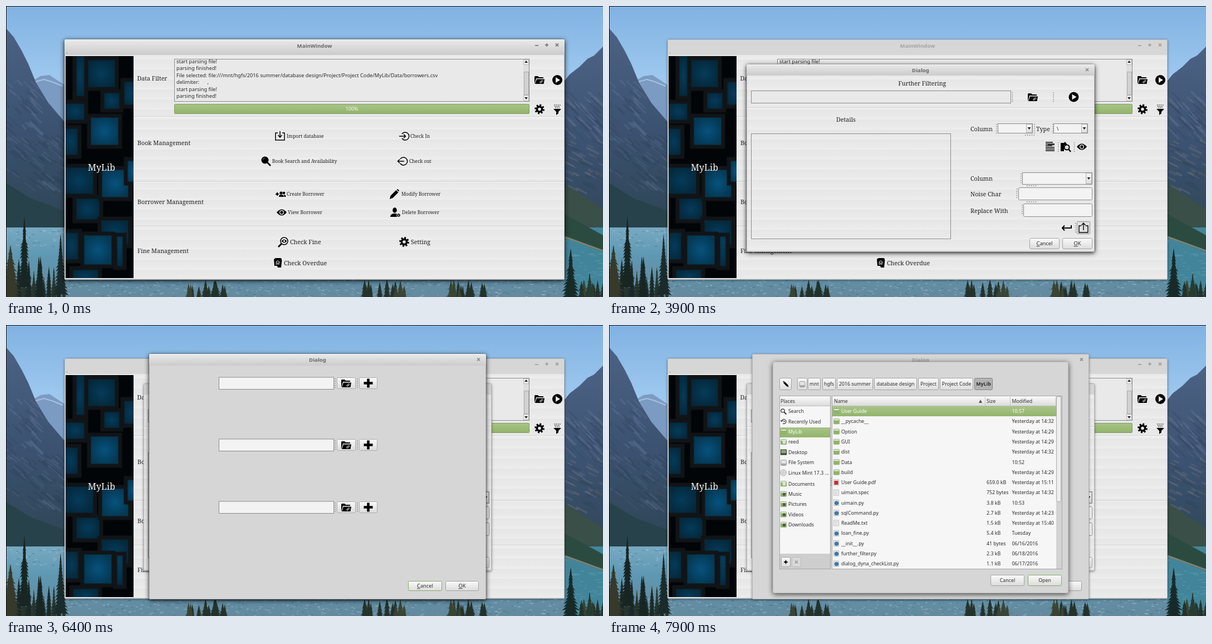
An HTML page for the animation above (8 s loop, 1072 px wide and 523 px high).

```html
<!DOCTYPE html>
<html lang="en">
<head>
<meta charset="utf-8">
<title>Library desktop</title>
<style>
html, body { margin: 0; width: 100%; height: 100%; overflow: hidden; background: #000; }
svg { display: block; width: 1072px; height: 523px; font-family: "Noto Sans", "Open Sans", sans-serif; }
text { white-space: pre; }
.serif { font-family: "Noto Serif", serif; }
.glow { filter: drop-shadow(0 2px 5px rgba(0,0,0,.7)); }
.soft { filter: drop-shadow(0 1px 2px rgba(0,0,0,.45)); }
.fade { animation: fade 8s step-end infinite; }
@keyframes fade { 0% { opacity: 0 } 7.5% { opacity: .85 } 8.75% { opacity: 1 } }
</style>
</head>
<body>
<svg id="stage" viewBox="0 0 1072 523">
<defs>
  <linearGradient id="sky" x2="0" y2="1"><stop stop-color="#80b2e2"/><stop offset=".35" stop-color="#a2cbf0"/><stop offset="1" stop-color="#c3dcf2"/></linearGradient>
  <linearGradient id="rock" x2="0" y2="1"><stop stop-color="#4c6284"/><stop offset=".5" stop-color="#3c5271"/><stop offset="1" stop-color="#2d4555"/></linearGradient>
  <linearGradient id="lake" x2="0" y2="1"><stop stop-color="#78a9c2"/><stop offset=".4" stop-color="#5f98b2"/><stop offset="1" stop-color="#64899d"/></linearGradient>
  <linearGradient id="bar" x2="0" y2="1"><stop stop-color="#eaeaea"/><stop offset="1" stop-color="#cbcbcb"/></linearGradient>
  <linearGradient id="btn" x2="0" y2="1"><stop stop-color="#fafafa"/><stop offset="1" stop-color="#dcdcdc"/></linearGradient>
  <linearGradient id="lit" x2="0" y2="1"><stop stop-color="#fff"/><stop offset="1" stop-color="#e8e8e8"/></linearGradient>
  <linearGradient id="green" x2="0" y2="1"><stop stop-color="#a8c487"/><stop offset="1" stop-color="#92b46c"/></linearGradient>
  <linearGradient id="ask" x2="0" y2="1"><stop stop-color="#7ba4dc"/><stop offset="1" stop-color="#3a66b0"/></linearGradient>
  <linearGradient id="stripe" gradientUnits="userSpaceOnUse" x1="0" y1="6" x2="0" y2="24" spreadMethod="repeat"><stop stop-color="#e6e6e6"/><stop offset=".7" stop-color="#eaeaea"/><stop offset="1" stop-color="#eeeeee"/></linearGradient>
  <radialGradient id="tile"><stop stop-color="#07527d"/><stop offset="1" stop-color="#043752"/></radialGradient>
  <clipPath id="side"><path d="M107 90h122v399h-122z"/></clipPath>
  <clipPath id="log"><path d="M303 96h625v74h-625z"/></clipPath>
</defs>
</svg>
<script>
const LOOP = 8000;
const svg = document.getElementById('stage');

// Timed layers: class name, start and end in ms
const spans = {
  mainOn: [0, 600], funnelOn: [500, 600], dlgOn: [600, 4000], shareOn: [3900, 4000],
  ask: [4000, 6400], noLit: [4400, 6300], saveLit: [5100, 5200], noDown: [6300, 6400],
  pick: [6400, LOOP], pickOn: [6400, 7900], openLit: [7500, 7900], openDown: [7700, 7800],
  files: [7900, LOOP]
};
const pct = ms => ms / LOOP * 100 + '%';
const css = Object.entries(spans).map(([id, [a, b]]) =>
  `.${id}{animation:${id} 8s step-end infinite}@keyframes ${id}{` +
  (a ? '0%{opacity:0}' : '') + `${pct(a)}{opacity:1}` + (b < LOOP ? `${pct(b)}{opacity:0}` : '') + '}').join('');
document.head.appendChild(document.createElement('style')).textContent = css;

let seed = 7;
const rnd = () => (seed = seed * 16807 % 2147483647) / 2147483647;

const fill = (x, y, w, h, c, more = '') => `<rect x="${x}" y="${y}" width="${w}" height="${h}" fill="${c}" ${more}/>`;
const box = (x, y, w, h, c = '#e9e9e9', line = '#8c8c8c', r = 0) =>
  fill(x + .5, y + .5, w - 1, h - 1, c, `stroke="${line}" rx="${r}"`);
const poly = (d, c, more = '') => `<path d="${d}" fill="${c}" ${more}/>`;
const line = (d, w = 1.5, c = '#000', more = '') => `<path d="${d}" fill="none" stroke="${c}" stroke-width="${w}" ${more}/>`;
const text = (x, y, s, size = 9.2, c = '#2b2b2b', more = '') =>
  `<text x="${x}" y="${y}" font-size="${size}" fill="${c}" ${more}>${s}</text>`;
const serif = (x, y, s, size = 10.7, c = '#222') => text(x, y, s, size, c, 'class="serif"');
const mid = 'text-anchor="middle"';
const layer = (cls, s) => `<g class="${cls}">${s}</g>`;
const dots = (x, y, len, flat) => line(`M${x} ${y}${flat ? 'h' : 'v'}${len}`, 1.3, '#777', 'stroke-dasharray="1.5 2.4"');
const key = s => `<tspan text-decoration="underline">${s[0]}</tspan>${s.slice(1)}`;
const button = (x, y, w, h, s = '', edge = '#a2a2a2', face = 'url(#btn)', size = 9.3) =>
  box(x, y, w, h, face, edge, 2) + text(x + w / 2, y + h / 2 + 3.3, s, size, '#2b2b2b', mid);
const cross = (x, y, c) => line(`M${x - 2.5} ${y - 2.5}l5 5m0-5l-5 5`, 1.6, c);

const icons = {
  folder: poly('M-9 7V-6l1-1h5l2 2h8v2h-13l-2 7z', '#000') + poly('M-8 7l3-8.500h14l-1.500 8.500z', '#000') +
    '<g fill="none" stroke="#ddd" stroke-width=".9"><circle cx="2" cy="4" r="1.400"/><circle cx="4.600" cy="1.800" r="1.400"/></g>',
  play: '<circle r="9"/>' + poly('M-3-5l8 5-8 5z', '#f0f0f0'),
  gear: '<circle r="6.4"/><circle r="7.2" fill="none" stroke="#000" stroke-width="3.4" stroke-dasharray="2.83"/><circle r="2.8" fill="#e9e9e9"/>',
  funnel: poly('M-7-1h14l-5 5v3l-4 3v-6z', '#000') + line('M-6-8h12M-5-5.500h10M-4-3h8', 1.2, '#222', 'stroke-dasharray="2 1.3"'),
  load: line('M-4-6h-4v13h16v-13h-4M0-9v11M-3.500-2l3.500 4 3.500-4'),
  search: '<circle cx="-2" cy="-2" r="6.500"/>' + line('M2 2l6 6', 2.6) + line('M-6-2q0-4 4-4', .8, '#888'),
  enter: line('M-4-4a7 7 0 1 1 0 8M-9 0h11M-1-3.500l3.500 3.500-3.500 3.500'),
  leave: line('M-4-4a7 7 0 1 1 0 8M-8 0h11M-5-3.500l-3.500 3.500 3.500 3.500'),
  people: line('M-9 0h6M-6-3v6', 2) + '<circle cx="1" cy="-2" r="2.600"/><circle cx="6" cy="-2" r="2.300"/>' + poly('M-3 5q0-4 4-4 5 0 5 4zM6.700 5q0-3-1.200-4 4 0 4 4z', '#000'),
  pencil: poly('M-9 9l1.500-6 10-10 4 4-10 10zM3.500-8l1.500-1q1 0 3 2.500l-1 2z', '#000'),
  eye: poly('M-9 0q9-11 18 0-9 11-18 0z', '#000') + '<circle r="4" fill="#eee"/><circle r="2.700"/>',
  person: '<ellipse cx="-1" cy="-4" rx="3.800" ry="4.700"/>' + poly('M-9 8q0-5 6-6h4q5 1 5 6z', '#000') + '<circle cx="6" cy="5" r="3.300" stroke="#eee"/><circle cx="6" cy="5" r="1" fill="#eee"/>',
  inspect: '<circle cx="1.500" cy="-1.500" r="6.500" fill="none" stroke="#000" stroke-width="1.500"/>' + line('M-3 3l-6 6', 2.8) + `<g transform="translate(1.500 -1.500) scale(.55)">${poly('M-9 0q9-11 18 0-9 11-18 0z', '#000')}<circle r="3" fill="#eee"/></g>`,
  head: poly('M-7-7l3-2h9q3 0 2 8l-1 9h-6l-1-3h-5z', '#000') + line('M-4 2h7M-3 0q0-4 3-4t3 4z', 1, '#eee'),
  list: line('M-8-8h13M-8-5h16M-8-2h12M-8 1h16M-8 4h16M-8 7h16', 1.6) + line('M-4-4h12', 2.4, '#333'),
  page: poly('M-9-7h6l2-2 3 4v2h-5v11h-6z', '#000') + '<circle cx="2" cy="1" r="4.500" fill="#ddd" stroke="#000" stroke-width="2"/>' + line('M5 4l4 5', 2.4),
  back: line('M8-5v5h-16M-4-4.500l-4 4.500 4 4.500', 2),
  share: line('M-4-4h-4v12h16v-12h-4M0 4v-12M-3.500-5l3.500-4 3.500 4', 1.4),
  plus: line('M-8 0h16M0-8v16', 4.5)
};
const icon = (id, x, y, k = 1, flip = k) => `<g transform="translate(${x} ${y}) scale(${flip} ${k})">${icons[id]}</g>`;

// Window frame with a flat bar, plus a livelier one while it has focus
function frame(x, y, w, h, bar, title, tx, ty, on, body) {
  const shape = c => `<rect x="${x}" y="${y}" width="${w}" height="${h}" rx="3" fill="#d6d6d6" class="${c}"/>`;
  const head = c => text(tx, ty, title, 9.65, c, mid + ' font-weight="700"');
  return layer(on, shape('glow')) + shape('soft') + box(x, y, w, h, '#d6d6d6', '#b5b5b5', 3) + head('#a3a3a3') +
    layer(on, fill(x, y, w, bar, 'url(#bar)', 'rx="3"') + fill(x + 2, y, w - 4, 1, '#f6f6f6') + head('#666')) + body;
}

function conifer(x, top, h, w, c) {
  let l = '', r = '';
  const n = Math.max(4, Math.round(h / 6));
  for (let i = 1; i <= n; i++) {
    const y = top + h * i / n, s = w / 2 * i / n * (.7 + rnd() * .5);
    r += `L${x + s} ${y}L${x + s * .5} ${y - 2}`;
    l = `L${x - s * .5} ${y - 2}L${x - s} ${y}` + l;
  }
  return poly(`M${x} ${top}${r}${l}z`, c);
}

// Soft random streaks running down a slope
function streaks(x, y, w, h, lean, n, colors) {
  let s = '';
  for (let i = 0; i < n; i++) {
    const a = x + rnd() * w, b = y + rnd() * h, k = 8 + rnd() * 16;
    s += line(`M${a} ${b}l${k} ${k * lean}`, 1.5 + rnd() * 2.5, colors[i % colors.length], 'opacity=".35"');
  }
  return s;
}

function scene() {
  let s = fill(0, 0, 1072, 420, 'url(#sky)') +
    poly('M38 140l24-14 16-2 30 20v250h-70z', '#7b9bc2') + line('M50 137l18-5 14 4 20 8', 2, '#a8c2e0') +
    poly('M0 40l14 16 14 24 12 24 14 34 22 36 29 34v190H0z', 'url(#rock)') +
    streaks(-10, 130, 60, 90, 1, 40, ['#64779a', '#33465f']) + streaks(-10, 230, 105, 95, .8, 70, ['#556d86', '#2b3f55']) +
    poly('M0 318l45 28 60 22v34H0z', '#27424a') +
    poly('M1000 138l12-15 18-14 14-14 12-6 16-16v350h-72z', 'url(#rock)') +
    streaks(1000, 150, 66, 80, 1, 50, ['#6b7894', '#33455f']) + streaks(1000, 240, 66, 90, .5, 50, ['#77797a', '#34465a']) +
    poly('M1003 320l69 45v62l-69-30z', '#394f48') +
    fill(0, 398, 1003, 125, 'url(#lake)') + fill(1003, 398, 69, 125, '#42859a') +
    poly('M1003 374l69 38v30l-69-26z', '#2c4b40') + line('M1003 415l69 25', 3, '#7d8270');
  for (let i = 0; i < 900; i++)
    s += fill(rnd() * 1003, (i % 2 ? 490 : 402) + rnd() * 32, 2 + rnd() * 4, 1, i % 3 ? '#b4cbd8' : '#3d647c', 'opacity=".6"');
  for (let i = 0; i < 50; i++) s += fill(1003 + rnd() * 66, 440 + rnd() * 80, 3 + rnd() * 8, 1, '#73aab8', 'opacity=".5"');
  for (let x = -4; x < 108; x += 9) s += conifer(x, 450 + rnd() * 45, 95, 26, x % 2 ? '#1b2a28' : '#26352d');
  s += conifer(33, 377, 130, 27, '#172523') + conifer(62, 450, 75, 22, '#172523') +
    conifer(98, 410, 110, 25, '#1b2a2b') + conifer(8, 430, 95, 42, '#37392a');
  for (let i = 0; i < 48; i++) {
    const x = [325, 640, 790, 1005][i % 4] + rnd() * 80;
    s += conifer(x, 490 + rnd() * 18, 44, 22, i % 3 ? '#24322b' : '#3a4433');
  }
  s += conifer(376, 493, 40, 30, '#20332c') + conifer(1014, 436, 95, 34, '#182a28') + conifer(1048, 480, 60, 24, '#263b31');
  return s + fill(0, 0, 1072, 1, '#111') + fill(0, 0, 1, 523, '#111');
}

function sidebar() {
  const tiles = [[147, 97, 49, 49], [212, 136, 24, 42], [176, 156, 28, 29], [152, 200, 50, 50], [107, 175, 34, 30],
    [104, 220, 25, 48], [105, 290, 52, 48], [126, 346, 42, 38], [172, 294, 48, 50], [218, 278, 20, 38],
    [171, 385, 49, 44], [105, 407, 25, 49], [199, 414, 11, 54], [140, 412, 50, 53], [126, 90, 15, 72], [120, 474, 46, 25]];
  const bright = [3, 8, 9, 13];
  const art = tiles.map(([x, y, w, h], i) => fill(x - 3, y - 3, w + 6, h + 6, 'url(#tile)',
    `stroke="#111416" stroke-width="7" ${bright.includes(i) ? '' : 'fill-opacity=".7"'}`)).join('');
  return fill(107, 90, 122, 399, '#020507') + `<g clip-path="url(#side)">${art}</g>` + serif(147, 296, 'MyLib', 16, '#f4f4f4');
}

function mainWindow() {
  const log = ['start parsing file!', 'parsing finished!',
    'File selected: file:///mnt/hgfs/2016 summer/database design/Project/Project Code/MyLib/Data/borrowers.csv',
    'delimiter:      ,', 'start parsing file!', 'parsing finished!'];
  const actions = [
    ['load', 492, 234, 504, 'Import database'], ['enter', 715, 234, 726, 'Check In'],
    ['search', 467, 279, 478, 'Book Search and Availability'], ['leave', 712, 279, 724, 'Check out'],
    ['people', 493, 338, 504, 'Create Borrower'], ['pencil', 698, 338, 710, 'Modify Borrower'],
    ['eye', 495, 371, 506, 'View Borrower'], ['person', 699, 371, 711, 'Delete Borrower'],
    ['inspect', 498, 424, 510, 'Check Fine', 1], ['gear', 715, 424, 727, 'Setting', 1], ['head', 488, 462, 499, 'Check Overdue', 1]];
  const win = c => line('M950 71h6', 1.5, c) + line('M968 70h6m-3-3v6', 1.5, c) + cross(989.500, 70, c);
  let s = win('#999') + layer('mainOn', win('#777')) + fill(106, 88, 896, 402, 'url(#stripe)') + fill(109, 84, 1, 1, '#555') + sidebar();
  for (const y of [198, 315, 395]) s += fill(229, y, 773, 1, '#cfcfcf') + fill(229, y + 1, 773, 1, '#f8f8f8');
  s += serif(235.500, 133.500, 'Data Filter') + serif(236, 250, 'Book Management') +
    serif(236, 356, 'Borrower Management') + serif(236, 444, 'Fine Management') + box(302, 95, 638, 77);
  s += '<g clip-path="url(#log)">' + log.map((t, i) => text(306, 103 + i * 12.4, t)).join('') + '</g>';
  s += fill(929, 96, 10, 75, '#dedede') + box(929, 96, 10, 10, '#eee', '#bbb') + box(929, 160, 10, 11, '#eee', '#bbb') +
    box(930, 118, 9, 42, '#d2d2d2', '#aaa') + poly('M931 102l3-4 3 4z', '#222') + poly('M931 164l3 4 3-4z', '#222') +
    box(302, 176, 638, 18, 'url(#green)', '#7f9c62', 1) + text(621, 188.300, '100%', 8.8, '#f5f8f0', mid);
  s += layer('funnelOn', box(979, 175, 22, 21, '#dedede', '#999', 2));
  s += icon('folder', 958, 133) + icon('play', 990, 133) + icon('gear', 958, 185.500) + icon('funnel', 990, 186);
  for (const [id, x, y, tx, t, big] of actions) s += icon(id, x, y) + serif(tx, y + (big ? 4 : 3.2), t, big ? 10.7 : 8.5);
  return frame(105, 60, 898, 432, 28, 'MainWindow', 554, 74.500, 'mainOn', s);
}

function combo(x, y, w, h) {
  return box(x, y, w, h, '#f3f3f3') + box(x + w - 12, y + 1, 11, h - 2, 'url(#btn)', '#b5b5b5') +
    poly(`M${x + w - 9.500} ${y + h / 2 - 2}h6l-3 4z`, '#222');
}

function filterDialog() {
  let s = cross(858.500, 114.500, '#888') + fill(248, 125, 623, 315, 'url(#stripe)') +
    serif(519.500, 143, 'Further Filtering') + box(255, 152, 467, 23) + dots(724.500, 155, 18) + icon('folder', 761, 164) +
    dots(798, 155, 18) + icon('play', 834.500, 163.500) + fill(248, 182, 623, 1, '#d0d0d0') + fill(248, 183, 623, 1, '#f7f7f7') +
    serif(408, 208, 'Details') + box(255, 229, 359, 190, 'url(#stripe)') +
    serif(649, 225, 'Column') + dots(696, 212, 18) + combo(698, 211, 63, 18) + dots(764, 212, 18) +
    serif(767, 225, 'Type') + dots(797, 212, 18) + combo(798, 211, 62, 18) + text(804, 223.500, '\\') + dots(747, 232, 17, 1) +
    icon('list', 792, 253) + dots(807, 245, 18) + icon('page', 820, 253) + dots(835.500, 245, 18) + icon('eye', 849, 253) +
    serif(649, 314, 'Column') + dots(740, 301, 19) + combo(742, 299, 126, 22) + dots(750, 323, 19, 1) +
    serif(649, 342, 'Noise Char') + dots(732.500, 328, 19) + box(735, 326, 133, 23, '#f3f3f3', '#8c8c8c', 2) + dots(750, 352, 19, 1) +
    serif(649, 372, 'Replace With') + dots(742, 357, 19) + box(744, 355, 124, 24, '#f3f3f3', '#8c8c8c', 2) +
    layer('shareOn', box(840, 387, 24, 23, '#e2e2e2', '#8f8f8f', 1)) +
    icon('back', 822, 399) + dots(837.500, 390, 19) + icon('share', 852, 399) +
    button(755, 417, 54, 20, key('Cancel')) + button(814, 417, 54, 20, key('OK'));
  return layer('fade', frame(247, 105, 625, 337, 20, 'Dialog', 559.500, 118.700, 'dlgOn', s));
}

function askBox() {
  const no = (edge, face) => button(575, 277, 61, 18, key('No'), edge, face);
  return layer('ask', frame(462, 222, 183, 82, 20, 'Want to write file?', 554, 235.300, 'ask',
    cross(631.500, 231, '#777') + box(472, 250, 22, 22, 'url(#ask)', '#3d62a0', 2) +
    poly('M475 260q0-7 8-7t8 7-8 6l-4 4v-4q-4-1-4-6z', '#f7f9fc') + text(483, 263.500, '?', 10, '#3f6db5', mid + ' font-weight="700"') +
    text(508, 258, 'click Save to save filtered file!', 9.35) +
    button(509, 277, 60, 18, key('Save')) + layer('saveLit', button(509, 277, 60, 18, key('Save'), '#a2a2a2', 'url(#lit)')) +
    no('#82a45d', 'url(#btn)') + layer('noLit', no('#82a45d', 'url(#lit)')) + layer('noDown', no('#7c8a6c', '#b2b2b2'))));
}

function pickDialog() {
  let s = cross(848.500, 62, '#888');
  [94, 205, 317].forEach((y, i) => {
    const open = face => button(594, y, 34, 21, '', '#aaa', face);
    s += box(382, y - .5, 207, 22.5, '#f3f3f3') + dots(591, y + 2, 18) + open('url(#btn)') +
      (i ? '' : layer('openLit', open('url(#lit)')) + layer('openDown', open('#b8b8b8'))) +
      icon('folder', 611, y + 11) + dots(631, y + 2, 18) + button(634, y, 33, 21, '', '#aaa') + icon('plus', 650.500, y + 10.500);
  });
  s += button(722, 460, 61, 18, key('Cancel'), '#8aa96c') + button(789, 460, 60, 18, key('OK'));
  return layer('pick', frame(257, 52, 605, 441, 21, 'Dialog', 559.500, 66.300, 'pickOn', s));
}

function fileDialog() {
  const size = 8.8;
  const crumbs = [[357, 23, 'mnt'], [383, 24, 'hgfs'], [409, 65, '2016 summer'], [476, 77, 'database design'], [555, 37, 'Project'], [594, 60, 'Project Code']];
  const places = ['Search', 'Recently Used', 'MyLib', 'reed', 'Desktop', 'File System', 'Linux Mint 17.3 ...', 'Documents', 'Music', 'Pictures', 'Videos', 'Downloads'];
  const rows = `User Guide||10:57
__pycache__||Yesterday at 14:32
Option||Yesterday at 14:29
GUI||Yesterday at 14:29
dist||Yesterday at 14:32
Data||10:52
build||Yesterday at 14:29
User Guide.pdf|659.0 kB|Yesterday at 15:11
uimain.spec|752 bytes|Yesterday at 14:32
uimain.py|3.8 kB|10:53
sqlCommand.py|2.7 kB|Yesterday at 14:23
ReadMe.txt|1.5 kB|Yesterday at 15:40
loan_fine.py|5.4 kB|Tuesday
__init__.py|41 bytes|06/16/2016
further_filter.py|2.3 kB|06/18/2016
dialog_dyna_checkList.py|1.1 kB|06/17/2016`.split('\n').map(r => r.split('|'));
  const folder = (x, y) => box(x, y - 5, 11, 10, '#e8eee0', '#93a880', 1) + fill(x + .5, y - 2, 10, 6.500, '#8fb568');
  const drive = (x, y) => box(x, y - 5, 11, 11, '#e4e4e4', '#999', 2) + fill(x + 1, y + 2, 9, 3, '#aaa');
  const small = (x, y, s, c, more) => text(x, y + 3.2, s, size, c, more);

  let s = `<rect x="294" y="66" width="531" height="416" rx="4" fill="#d6d6d6" class="glow"/>` + box(294, 66, 531, 416, '#d6d6d6', '#bcbcbc', 4) +
    button(306, 95, 22, 22) + icon('pencil', 317, 106, .6, -.6) + button(338, 95, 18, 22) + drive(341.500, 106);
  for (const [x, w, t] of crumbs) s += button(x, 95, w, 22, t, '#a2a2a2', 'url(#btn)', size);
  s += box(656, 95, 33, 22, '#b3b3b3', '#858585', 2) + small(672.500, 106, 'MyLib', '#2b2b2b', mid + ' font-weight="700"');

  s += box(306, 127, 92, 312, '#f6f6f6', '#a5a5a5') + fill(307, 128, 90, 17, 'url(#btn)') + fill(307, 145, 90, 1, '#bbb') + small(308, 137, 'Places') +
    fill(307, 184, 90, 18, 'url(#green)') + fill(307, 411, 90, 27, '#cecece') +
    button(309, 417, 17, 18) + icon('plus', 317.500, 426, .42) + button(328, 417, 17, 18, '', '#bbb', '#d9d9d9') + cross(336.500, 426, '#999');
  places.forEach((t, i) => {
    const y = 155 + i * 18.4 + (i > 6 ? 1.5 : 0), x = 308;
    if (i == 0) s += `<circle cx="312" cy="${y - 1}" r="3.200" fill="none" stroke="#333" stroke-width="1.300"/>` + line(`M314.500 ${y + 1.500}l4 4`, 1.8, '#333');
    else if (i == 1) s += line(`M310 ${y}a4 4 0 1 1 2 3.500M308 ${y - 2}l2 2 2-2M314 ${y - 2}v2h2`, 1.2, '#333');
    else if (i == 5) s += drive(x, y);
    else if (i == 6) s += `<circle cx="313" cy="${y}" r="5.500" fill="#ddd" stroke="#aaa"/><circle cx="313" cy="${y}" r="1.500" fill="#fff" stroke="#aaa"/>`;
    else if (i == 4) s += box(x, y - 5, 11, 10, '#86ad60', '#333') + fill(x, y + 2, 11, 2, '#333');
    else s += folder(x, y) + (i > 2 ? fill(x + 4, y - 2, 5, 5, i < 8 ? '#dfe8d6' : '#4c5d48') : '');
    s += small(322, y, t, i == 2 ? '#fff' : '#2b2b2b');
  });
  s += dots(399, 275, 16);

  s += box(400, 127, 414, 312, '#f6f6f6', '#a5a5a5') + fill(401, 128, 402, 17, 'url(#btn)') + fill(401, 145, 402, 1, '#bbb') +
    small(404, 137, 'Name') + poly('M664 140l3-6 3 6z', '#555') + small(678, 137, 'Size') + small(723.500, 137, 'Modified');
  for (const x of [675, 720, 802]) s += fill(x, 129, 1, 16, '#c4c4c4');
  s += fill(401, 146, 402, 18, 'url(#green)') + fill(803, 128, 10, 310, '#d2d2d2') + box(803, 128, 9, 190, '#eee', '#aaa', 3);
  rows.forEach(([name, bytes, date], i) => {
    const y = 155 + i * 18.27, c = i ? '#2b2b2b' : '#fff';
    if (i < 7) s += folder(403, y);
    else {
      s += box(403, y - 5.500, 10, 11, '#f2f2f2', '#bbb');
      if (name.endsWith('.py')) s += `<circle cx="408.500" cy="${y + .5}" r="3.800" fill="#3d78ad"/>`;
      else if (name.endsWith('.pdf')) s += fill(404.500, y - 3, 7, 7, '#c8272b');
      else s += line(`M405 ${y - 2.500}h6m-6 2.500h6m-6 2.500h5`, .8, '#bbb');
    }
    s += small(417, y, name, c) + small(678, y, bytes, c) + small(723.500, y, date, c);
  });
  s += button(685, 449, 61, 20, 'Cancel', '#a2a2a2', 'url(#btn)', size) + button(752, 449, 61, 20, 'Open', '#86ad60', 'url(#btn)', size);
  return layer('files', s);
}

svg.insertAdjacentHTML('beforeend', scene() + mainWindow() + filterDialog() + askBox() + pickDialog() + fileDialog());
</script>
</body>
</html>
```
